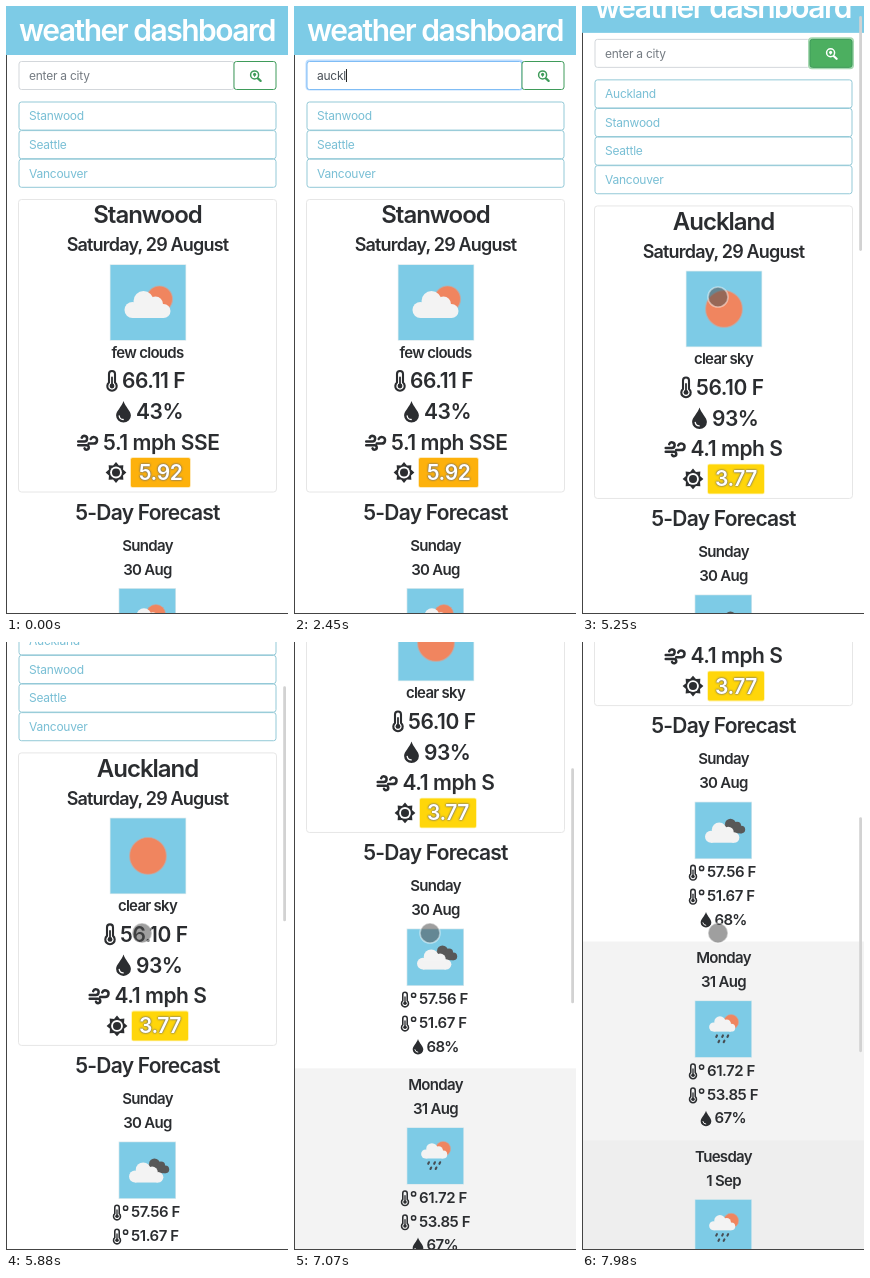
Recreate the animation shown at these times as an HTML page. Size 282x608 px, loop 8 s.

```html
<!DOCTYPE html>
<html lang="en">
<head>
<meta charset="utf-8">
<title>Weather dashboard</title>
<style>
html, body { margin: 0; width: 100%; height: 100%; overflow: hidden; background: #fff; }
svg { display: block; width: 100%; height: 100%; }
text { font-family: Inter, "Open Sans", sans-serif; }
.badge { text-shadow: 0 0 2px #666, 0 0 2px #777; }
</style>
</head>
<body>
<svg id="stage" viewBox="0 0 282 608"></svg>
<script>
const LOOP = 8000, SKY = '#7dcbe6', INK = '#2b2d30', SUN = '#f0855f', GREEN = '#3f9b5a';
const ROW = 28.6, LOADED = 3850, PRESSED = 3640, FOCUSED = 910;

// ---- drawing helpers ----
const rect = (x, y, w, h, fill, more = '') =>
  `<rect x="${x}" y="${y}" width="${w}" height="${h}" fill="${fill}" ${more}/>`;
const disc = (x, y, r, fill, more = '') =>
  `<circle cx="${x}" cy="${y}" r="${r}" fill="${fill}" ${more}/>`;
const at = (x, y, s, body, more = '') =>
  `<g transform="translate(${x} ${y}) scale(${s})" ${more}>${body}</g>`;
const label = (x, y, size, str, o = {}) =>
  `<text x="${x}" y="${y}" font-size="${size}" font-weight="${o.weight || 560}" fill="${o.fill || INK}"
    text-anchor="${o.anchor || 'start'}" letter-spacing="${o.track ?? -0.02}em" ${o.more || ''}>${str}</text>`;
const title = (y, size, str, track) => label(141.5, y, size, str, { anchor: 'middle', track });
const stroke = (d, w, color = INK) =>
  `<path d="${d}" fill="none" stroke="${color}" stroke-width="${w}" stroke-linecap="round" stroke-linejoin="round"/>`;

// ---- small glyphs, about 20 units high, centred on 0,0 ----
const thermometer =
  stroke('M-3 2V-6.5a3 3 0 0 1 6 0V2a4.7 4.7 0 1 1-6 0z', 2.1) +
  stroke('M0 5V-3', 1.8) + disc(0, 5.5, 2.4, INK);
const drop =
  `<path d="M0-10.5C1.6-5 7.4-.5 7.4 4a7.4 7 0 0 1-14.8 0C-7.4-.5-1.6-5 0-10.5z" fill="${INK}"/>` +
  stroke('M-4.3 4.5A4.2 4.2 0 0 0-.3 8', 1.3, '#fff');
const wind =
  stroke('M-9.3-.5H-3.2a2.8 2.8 0 1 0-2.6-3.8M-9.3 3.3H-1a2.2 2.2 0 1 1-2 3M1.2 1.6H6.2a3.3 3.3 0 1 0-3-4.6', 2.5);
const star = Array.from({ length: 16 }, (_, i) => {
  const r = i % 2 ? 7.6 : 10.4, a = i * Math.PI / 8;
  return (r * Math.cos(a)).toFixed(2) + ',' + (r * Math.sin(a)).toFixed(2);
}).join(' ');
const sunGlyph = `<polygon points="${star}" fill="${INK}"/>` + disc(0, 0, 5.9, '#fff') + disc(0, 0, 4, INK);
const searchGlyph = c => stroke('M2.9 2.9L5.6 5.4', 2.2, c) +
  `<circle r="4" cx="-.4" cy="-.6" fill="none" stroke="${c}" stroke-width="1.5"/>` +
  disc(-.4, -1.2, 1.5, c) + `<path d="M-1.7-.8L-.4 1.7.9-.8z" fill="${c}"/>`;

// ---- weather tiles, 75 units square ----
const cloud = c => disc(-15, 5, 8, c) + disc(-4, -4, 10, c) + disc(8, -1, 7.5, c) +
  disc(16, 6, 7, c) + rect(-15, 1, 31, 12, c);
const WHITE = '#f3f3f3';
const sun = (x, y, r) => disc(x, y, r, SUN, 'stroke="#c3aaa4" stroke-opacity=".7" stroke-width="1.2"');
const tiles = {
  few: sun(49, 34, 13) + at(37, 40, 1, cloud(WHITE)),
  clear: sun(37.5, 37.5, 18.4),
  broken: at(50, 32, .73, cloud('#585858')) + at(36, 41, 1, cloud(WHITE)),
  rain: sun(48, 28, 10) + at(36, 31, .76, cloud(WHITE)) +
    stroke('M29 46l-1 2M37 46l-1 2M44 46l-1 2M32 53l-1 2M39 53l-1 2', 2.8, '#474d53'),
};
const tile = (x, y, size, kind) =>
  rect(x - .7, y - .7, size + 1.4, size + 1.4, '#d9e9ed') +
  at(x, y, size / 75, rect(0, 0, 75, 75, SKY) + tiles[kind]);

// ---- page sections ----
function day(i, [name, date, kind, high, low, wet]) {
  const y = 523.2 + i * 198.7;
  const degrees = (dy, v) => at(111, y + dy, .74, thermometer) +
    `<circle cx="119.6" cy="${y + dy - 4}" r="2.1" fill="none" stroke="${INK}" stroke-width="1.5"/>` +
    label(125, y + dy + 5, 15, v, { track: -.03 });
  return (i ? rect(1, y, 281, 199, i == 1 ? '#f3f3f3' : '#eee') : '') +
    title(y + 21.5, 15, name, -.045) + title(y + 45.6, 15, date, -.045) + tile(113.3, y + 59.6, 56, kind) +
    degrees(129.6, high) + degrees(153.6, low) +
    at(124, y + 176.8, .72, drop) + label(132.5, y + 182, 15, wet, { track: -.045 });
}

function report(c) {
  const row = (glyph, gx, tx, y, str) => at(gx, y, 1, glyph) + label(tx, y + 7.6, 21, str, { track: -.022 });
  return rect(12.5, 193.5, 258, 292.5, 'none', 'rx="3" stroke="#e6e6e6"') +
    title(217.3, 24, c.city, -.042) + title(245.4, 18, 'Saturday, 29 August', -.045) +
    tile(104.5, 259, 75, c.kind) + title(352, 15, c.sky, -.048) +
    row(thermometer, c.x[0], c.x[1], 374.5, c.temp) +
    row(drop, 117.5, 130, 405.5, c.wet) +
    row(wind, c.x[2], c.x[3], 436, c.wind) +
    at(c.x[4], 466.5, 1, sunGlyph) +
    rect(c.x[5], 452, c.x[6], 29, c.tint, `rx="1.5" stroke="${c.tint}" stroke-opacity=".35" stroke-width="1.6"`) +
    label(c.x[5] + c.x[6] / 2, 474, 21, c.uv, { anchor: 'middle', fill: '#fff', track: -.02, more: 'class="badge"' }) +
    title(513.7, 21, '5-Day Forecast', -.037) +
    c.days.map((d, i) => day(i, d)).join('');
}

const links = names => names.map((n, i) =>
  rect(13, 96 + i * ROW, 257, 28.1, '#fff', 'rx="2.5" stroke="#93c9d7"') +
  label(23, 114.4 + i * ROW, 12, n, { weight: 400, fill: '#79bfd5' })).join('');

const before = {
  city: 'Stanwood', kind: 'few', sky: 'few clouds', temp: '66.11 F', wet: '43%', wind: '5.1 mph SSE',
  uv: '5.92', tint: '#fdb10c', x: [106, 116, 81.5, 97, 110, 125, 59],
  days: [['Sunday', '30 Aug', 'few', '', '', '']],
};
const after = {
  city: 'Auckland', kind: 'clear', sky: 'clear sky', temp: '56.10 F', wet: '93%', wind: '4.1 mph S',
  uv: '3.77', tint: '#ffd60a', x: [104, 114, 93, 108.5, 111, 126, 56],
  days: [
    ['Sunday', '30 Aug', 'broken', '57.56 F', '51.67 F', '68%'],
    ['Monday', '31 Aug', 'rain', '61.72 F', '53.85 F', '67%'],
    ['Tuesday', '1 Sep', 'rain', '', '', ''],
  ],
};
const cities = ['Stanwood', 'Seattle', 'Vancouver'];

document.getElementById('stage').innerHTML =
  rect(0, 0, 282, 608, '#fff') + rect(0, 0, 1, 608, '#444') +
  `<g id="page">
    ${rect(0, 0, 282, 49, SKY)}
    ${label(141, 34.6, 30, 'weather dashboard', { anchor: 'middle', fill: '#fff', track: -.05 })}
    <rect id="glow" x="11.5" y="53.5" width="218" height="31" rx="4" fill="#bfdeff"/>
    <rect id="field" x="13" y="55.5" width="215" height="28" rx="2.5" fill="#fff"/>
    <text id="entry" x="23" y="74" font-size="12" letter-spacing="-.02em"></text>
    <rect id="caret" y="63" width="1" height="13" fill="#222"/>
    <rect id="ring" x="226" y="53.5" width="46" height="32" rx="4" fill="#a6d8b1"/>
    <rect id="button" x="228" y="55.5" width="42" height="28" rx="2.5" stroke="${GREEN}"/>
    <g id="idle">${at(249, 69.5, 1, searchGlyph(GREEN))}</g>
    <g id="lit">${at(249, 69.5, 1, searchGlyph('#fff'))}</g>
    <g id="old">${links(cities)}${report(before)}</g>
    <g id="new">${links(['Auckland', ...cities])}<g transform="translate(0 ${ROW})">${report(after)}</g></g>
  </g>
  <rect id="bar" x="277.2" width="2.8" height="235" rx="1.4" fill="#d2d2d2"/>
  ${rect(0, 607, 282, 1, '#444')}
  <circle id="pointer" r="10" fill="#505050" fill-opacity=".55" stroke="#fff" stroke-opacity=".45" stroke-width="1.6"/>`;

const el = {};
document.querySelectorAll('[id]').forEach(n => el[n.id] = n);
const show = (n, on) => n.setAttribute('display', on ? 'inline' : 'none');
const set = (n, o) => { for (const k in o) n.setAttribute(k, o[k]); };

// ---- motion ----
const smooth = p => p * p * (3 - 2 * p);
function track(keys, t, ease) {
  if (t <= keys[0][0]) return keys[0].slice(1);
  for (let i = 1; i < keys.length; i++) {
    const a = keys[i - 1], b = keys[i];
    if (t <= b[0]) {
      const p = ease((t - a[0]) / (b[0] - a[0]), i);
      return a.slice(1).map((v, j) => v + (b[j + 1] - v) * p);
    }
  }
  return keys[keys.length - 1].slice(1);
}
const arriving = [[70, -12, 330], [840, 118, 72]];
const leaving = [[3150, 118, 72], [3570, 249, 70], [4060, 249, 70], [4200, 230, 89], [4700, 136, 291]];
const scrolling = [[4830, 0], [5250, 22], [5880, 111], [7070, 324], [7980, 451]];
const strokes = [1470, 1680, 2030, 2170, 2380, 2520, 2730, 2870];

function draw(t) {
  const loaded = t >= LOADED, focus = t >= FOCUSED && t < PRESSED, lit = t >= 3500;
  // The sixth letter lands after the fifth has been on show for a moment.
  const typed = loaded ? '' : 'auckland'.slice(0, strokes.filter(s => s <= t).length);

  show(el.old, !loaded);
  show(el.new, loaded);
  show(el.glow, focus);
  set(el.field, { stroke: focus ? '#80bdf5' : '#d3d7db' });
  el.entry.textContent = typed || 'enter a city';
  set(el.entry, { fill: typed ? '#495057' : '#747b82' });
  show(el.caret, focus);
  set(el.caret, { x: 23 + (typed ? el.entry.getComputedTextLength() : 0) });

  show(el.ring, t >= PRESSED);
  set(el.button, { fill: lit ? '#4caf60' : '#fff' });
  show(el.idle, !lit);
  show(el.lit, lit);

  const [y] = track(scrolling, t, (p, i) => i == 1 ? p * p : p);
  set(el.page, { transform: `translate(0 ${-y.toFixed(2)})` });
  show(el.bar, t >= 4830);
  set(el.bar, { y: 1.5 + y * .385 });

  const [px, py] = track(t < 2000 ? arriving : leaving, t, smooth);
  show(el.pointer, (t >= 70 && t < 1260) || t >= 3150);
  set(el.pointer, { cx: px, cy: py });
}

const start = performance.now();
function frame() {
  draw((performance.now() - start) % LOOP);
  requestAnimationFrame(frame);
}
draw(0);
requestAnimationFrame(frame);
</script>
</body>
</html>
```
